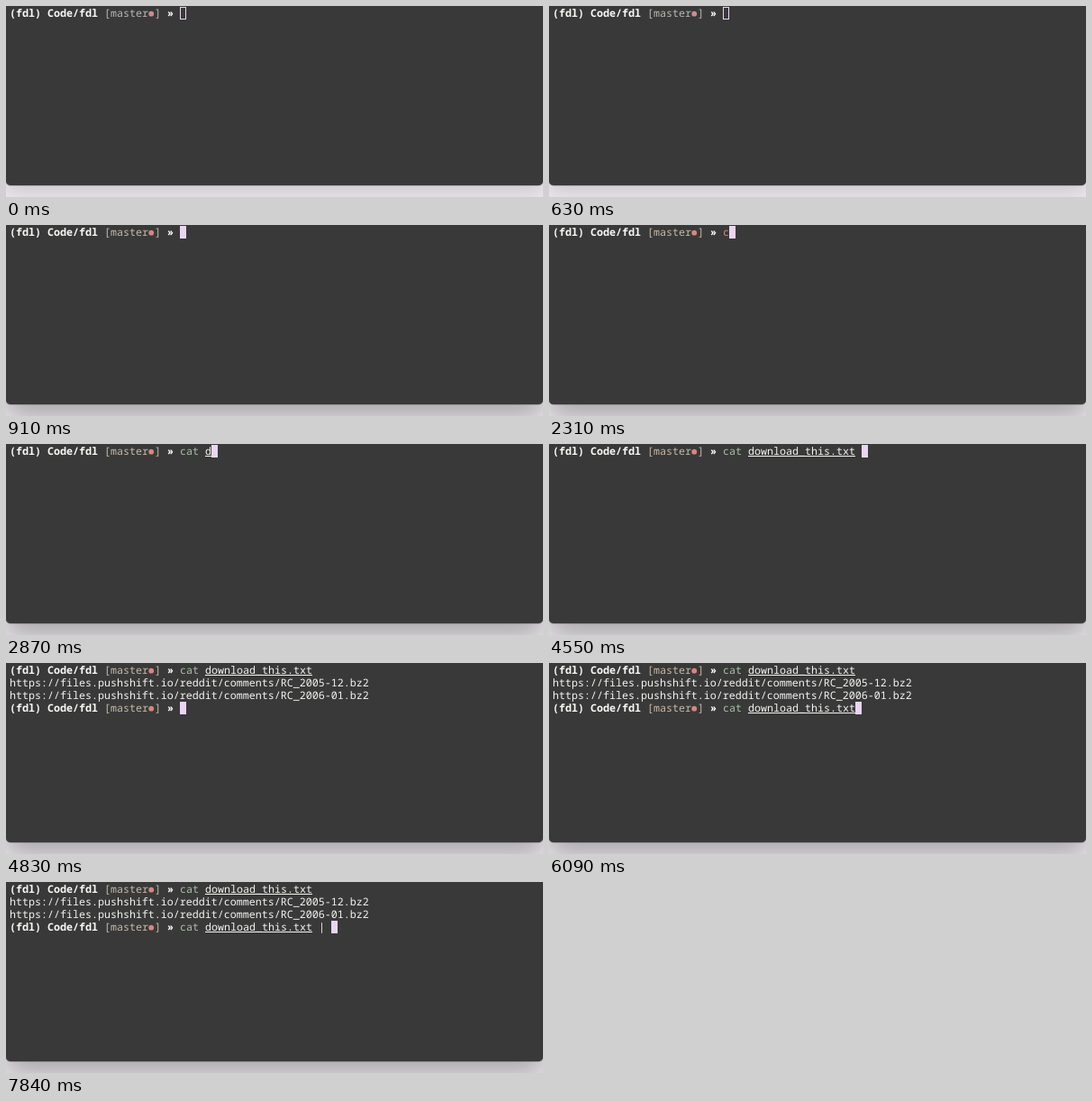
Animation of 596 by 212 pixels, one loop 8000 ms. Source, as an HTML page:

```html
<!DOCTYPE html>
<html lang="en">
<head>
<meta charset="utf-8">
<title>Terminal session</title>
<style>
  html, body { margin: 0; width: 100%; height: 100%; overflow: hidden; background: #ebe7ec; }
  #stage { position: relative; width: 596px; height: 212px; overflow: hidden; background: #ebe7ec; }
  #window {
    position: absolute; left: 0; top: -60px; width: 596px; height: 259px;
    border-radius: 5px; background: #393939;
    animation: focus 8s step-end infinite;
  }
  @keyframes focus {
    0% { box-shadow: 0 0 0 .5px #0006, 0 8px 20px rgba(0, 0, 0, .13); }
    11.375%, 100% { box-shadow: 0 0 0 .5px #0006, 0 14px 30px rgba(0, 0, 0, .28); }
  }
  svg { position: absolute; left: 0; top: 0; }
  text {
    font: 500 11.667px "Noto Sans Mono", "DejaVu Sans Mono", monospace;
    text-rendering: geometricPrecision; white-space: pre; fill: #f4f4f1;
  }
  .bold { font-weight: 600; fill: #fbfbf8; }
  .branch { font-weight: 400; fill: #c8b9a9; }
  .dot { fill: #d58780; }
  .known { fill: #a9c0a6; }
  .unknown { fill: #dc837f; }
  .idle .branch { fill: #bcb7b2; }
  .idle .dot { fill: #c98d92; }
  .line { fill: #f4f4f1; }
  #cursor { fill: #ead5f3; stroke: #ead5f3; }
  .idle #cursor { fill: none; }
</style>
</head>
<body>
<div id="stage">
  <div id="window"></div>
  <svg id="screen" width="596" height="212">
    <g id="lines"></g>
    <rect id="cursor" width="6" height="13"/>
  </svg>
</div>
<script>
const LOOP = 8000, CELL = 7, ROW = 14, LEFT = 4, PROMPT = 27;
const FILE = "download_this.txt";
const FOCUS = 910, OUTPUT = 4620, READY = 4760;

// [time, typed text] for each of the two command lines
const first = [
  [0, ""], [2310, "c"], [2450, "ca"], [2590, "cat"], [2730, "cat "], [2870, "cat d"],
  [3010, "cat do"], [3150, "cat dow"], [3290, "cat down"], [3920, `cat ${FILE} `]
];
const second = [
  [READY, ""], [6090, `cat ${FILE}`], [6790, `cat ${FILE} `],
  [7280, `cat ${FILE} |`], [7840, `cat ${FILE} | `]
];
const urls = ["2005-12", "2006-01"].map(
  month => `https://files.pushshift.io/reddit/comments/RC_${month}.bz2`);

const screen = document.getElementById("screen");
const lines = document.getElementById("lines");
const cursor = document.getElementById("cursor");

const px = col => LEFT + col * CELL;
const run = (row, col, str, cls = "") =>
  `<text class="${cls}" x="${px(col)}" y="${12 + row * ROW}">${str}</text>`;

function prompt(row) {
  return run(row, 0, "(fdl) Code/fdl", "bold") +
    run(row, 15, "[master", "branch") +
    `<circle class="dot" cx="${px(22.5) - .3}" cy="${8.7 + row * ROW}" r="2.9"/>` +
    run(row, 23, "]", "branch") + run(row, 25, "»", "bold");
}

function command(row, typed) {
  const [, name, path, rest] = typed.match(/^(\w*) ?(\S*)(.*)$/);
  let out = run(row, PROMPT, name, name === "cat" ? "known" : "unknown");
  if (path) {
    out += run(row, PROMPT + 4, path) +
      `<rect class="line" x="${px(PROMPT + 4)}" y="${13 + row * ROW}" width="${path.length * CELL}" height="1"/>`;
  }
  return out + run(row, PROMPT + 4 + path.length, rest);
}

const typedAt = (steps, t) => steps.filter(s => s[0] <= t).pop()[1];

let shown = "";
function draw(t) {
  const typed = typedAt(first, t);
  let html = prompt(0) + command(0, typed);
  let row = 0, col = PROMPT + typed.length;
  if (t >= OUTPUT) {
    html += urls.map((url, i) => run(i + 1, 0, url)).join("");
    row = 3;
    col = 0;
  }
  if (t >= READY) {
    const next = typedAt(second, t);
    html += prompt(3) + command(3, next);
    col = PROMPT + next.length;
  }
  if (html !== shown) lines.innerHTML = shown = html;
  cursor.setAttribute("x", px(col) + .5);
  cursor.setAttribute("y", 1.5 + row * ROW);
  screen.classList.toggle("idle", t < FOCUS);
}

const start = performance.now();
function tick() {
  draw((performance.now() - start) % LOOP);
  requestAnimationFrame(tick);
}
tick();
</script>
</body>
</html>
```
